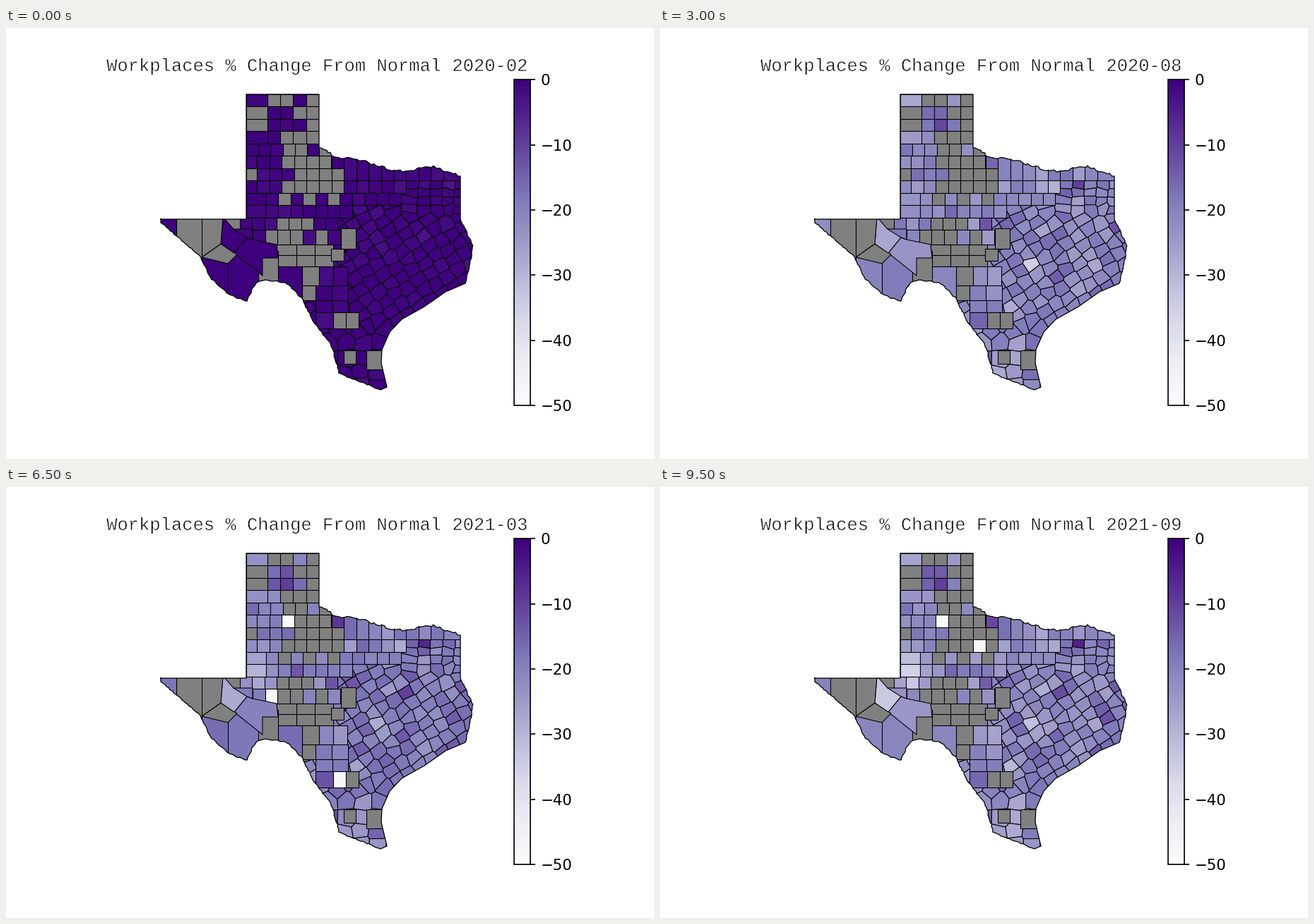
Write a matplotlib script that moves like this. It is 917 px wide and 611 px high and loops after 10000 ms.

```python
import numpy as np
import matplotlib.pyplot as plt
from matplotlib import patheffects
from matplotlib.animation import FuncAnimation
from matplotlib.collections import PolyCollection
from matplotlib.path import Path

W, H = 917, 611
DPI = W / 6
MONTHS = 20
rng = np.random.default_rng(12)

# State border, clockwise: a few turning points, roughened along the rivers
PANHANDLE = [(219, 271), (340, 271), (340, 94), (443, 94)]
RED_RIVER = [(443, 170), (466, 182), (503, 188), (540, 200), (565, 203), (604, 196), (643, 210)]
SABINE = [(643, 271), (661, 309), (654, 346), (650, 362)]
COAST = [(622, 374), (592, 395), (560, 413), (543, 431), (532, 456), (531, 475), (539, 509)]
RIO_GRANDE = [(530, 513), (472, 490), (460, 449), (436, 418), (419, 384), (396, 361),
              (366, 357), (353, 362), (340, 388), (314, 377), (290, 355), (276, 325),
              (236, 290), (219, 276)]

# Grid rows from the north: left edge, first width, pitch, count, columns without data
ROW_EDGES = [*(94 + 17.45 * np.arange(12)), 307, 322, 338, 365, 386, 403, 426]
ROWS = [(340, 30, 18.2, 5, {1, 2, 4}), (340, 30, 18.2, 5, {0, 3, 4}),
        (340, 30, 18.2, 5, {0, 4}), (340, 30, 18.2, 5, {2, 3, 4}),
        (340, 17.2, 17.2, 6, {3, 4}), (340, 15, 17.5, 7, {3, 4, 5, 6}),
        (340, 15, 17.6, 8, {0, 4, 5, 6, 7}), (340, 15, 17.6, 13, {3, 4, 5, 6, 7}),
        (340, 28, 17.4, 12, {2, 4, 6}), (340, 28, 17.4, 8, {}),
        (331, 17.3, 17.3, 8, {3, 4, 5}), (349, 17.7, 17.7, 7, {1, 2, 3, 5}),
        (383, 28, 26, 3, {0, 1, 2}), (383, 28, 26, 3, {0, 1, 2}),
        (419, 24, 20, 3, {0}), (419, 19, 23, 3, {0}),
        (438, 24, 22, 2, {}), (438, 25, 18, 3, {1, 2})]

# Local departures: x, y, radius, shift in the first and in the second summer
SPOTS = [(548, 232, 17, -12, -7), (518, 334, 12, -14, -9), (598, 355, 16, -9, -5),
         (592, 226, 8, 9, 13), (574, 283, 8, 3, 14), (532, 386, 8, 0, 18),
         (630, 320, 16, 2, 7), (472, 188, 25, 3, 8), (388, 130, 24, 3, 6),
         (350, 262, 26, -2, -17), (315, 298, 20, -6, -12), (500, 487, 35, -5, -5)]
# Counties with enough reports only in some months, all with deep drops
SPARSE = {(399, 190): (8, 13, 19), (452, 225): (8, 19), (376, 296): (8, 13, 17), (472, 414): (11, 13)}


def roughen(points, amount):
    """Resample a line every few pixels and jitter the new points."""
    pts = np.array(points, float)
    along = np.r_[0, np.hypot(*np.diff(pts, axis=0).T).cumsum()]
    t = np.linspace(0, along[-1], int(along[-1] / 3.5))
    line = np.column_stack([np.interp(t, along, axis) for axis in pts.T])
    line[1:-1] += rng.uniform(-amount, amount, (len(t) - 2, 2))
    return line


def box(x0, y0, x1, y1):
    return [(x0, y0), (x1, y0), (x1, y1), (x0, y1)]


def lattice(xs, ys, angle, jitter):
    """Seeded scatter around a grid turned about the middle of the eastern half."""
    grid = np.array([(x, y) for x in xs for y in ys], float)
    c, s = np.cos(angle), np.sin(angle)
    return grid @ [[c, s], [-s, c]] + (545, 330) + rng.uniform(-jitter, jitter, grid.shape)


def clip_half_plane(poly, normal, limit):
    out = []
    for p, q in zip(poly, poly[1:] + poly[:1]):
        dp, dq = normal @ p - limit, normal @ q - limit
        if dp <= 0:
            out.append(p)
        if dp * dq < 0:
            out.append(p + (q - p) * dp / (dp - dq))
    return out


def nearest_cell(site, sites):
    """The area closer to this site than to any other."""
    poly = [np.array(p, float) for p in box(400, 170, 680, 530)]
    order = np.argsort(((sites - site) ** 2).sum(1))
    for other in sites[order[1:28]]:
        normal = other - site
        poly = clip_half_plane(poly, normal, normal @ (site + other) / 2)
    return poly


cells, centres, usual = [], [], []


def add_cell(poly, has_data=True, centre=None):
    cells.append(np.array(poly, float))
    centres.append(np.mean(poly, axis=0) if centre is None else centre)
    usual.append(rng.normal(-19.5, 2.6) if has_data else np.nan)


# Irregular counties: tilted in the centre, flat rows in the north-east, larger in the south
tilted = lattice(np.arange(-190, 190, 19), np.arange(-170, 180, 16.5), -0.55, 3.2)
x, y = tilted.T
tilted = tilted[(x > 410) & (x < 670) & (y < 435) & ((y > 262) | (x < 560) & (y > 240))]
flat = lattice(np.arange(30, 120, 17), np.arange(-108, -70, 11.5), 0, 2.5)
south = lattice(np.arange(-110, 10, 23), np.arange(116, 185, 21), 0, 3)
sites = np.vstack([tilted, flat, south])
for site in sites:
    add_cell(nearest_cell(site, sites), centre=site)

# Counties along the Red River, then the grid over them
for k in range(11):
    left = 443 + 17.6 * k
    add_cell(box(left, 160, left + (24 if k == 10 else 17.6), 216), k > 0)
for top, bottom, (left, first, pitch, count, missing) in zip(ROW_EDGES, ROW_EDGES[1:], ROWS):
    edges = [left, *(left + first + pitch * np.arange(count))]
    for col in range(count):
        add_cell(box(edges[col], top, edges[col + 1], bottom), col not in missing)
for corners in [(460, 313, 478, 330), (474, 284, 495, 313), (478, 457, 495, 476), (510, 457, 533, 484)]:
    add_cell(box(*corners), False)

# Far west, painted back to front
add_cell(box(384, 338, 419, 390))
add_cell(box(314, 321, 384, 395))
add_cell(box(270, 325, 314, 395))
add_cell(box(357, 316, 385, 372), False)
add_cell([(341, 297), (349, 300), (383, 307), (385, 326), (363, 326), (363, 351), (323, 319)])
add_cell([(277, 325), (304, 306), (327, 321), (314, 334)], False)
add_cell([(307, 268), (341, 297), (323, 319), (304, 306)])
add_cell([(277, 268), (307, 268), (304, 306), (277, 325)], False)
add_cell(box(241, 268, 277, 330), False)
add_cell(box(215, 268, 241, 300))
add_cell([(307, 268), (331, 268), (331, 285), (322, 285)], False)
add_cell([(322, 285), (349, 285), (349, 300), (341, 297)])

# Change over time: a common level, local trends and monthly noise
centres, usual = np.array(centres), np.array(usual)
months = np.arange(MONTHS)
level = np.interp(months, [0, 2, 4, 8, 11, 12, 13, 14, 17, 18, 19],
                  [0.02, 1.8, 1.15, 0.95, 1.08, 1.3, 0.97, 0.93, 1.3, 1.1, 1.08])
values = level[:, None] * usual + rng.normal(0, 1, (MONTHS, len(usual)))
for x, y, radius, early, late in SPOTS:
    reach = np.exp(-((centres - (x, y)) ** 2).sum(1) / radius ** 2)
    trend = np.interp(months, [5, 17], [early, late]) * np.minimum(level, 1)
    values += trend[:, None] * reach
for place, reported in SPARSE.items():
    county = ((centres - place) ** 2).sum(1).argmin()
    values[list(reported), county] = -48
values = np.ma.masked_invalid(values)

fig = plt.figure(figsize=(W / DPI, H / DPI), dpi=DPI, facecolor="white")
ax = fig.add_axes([0, 0, 1, 1])
ax.set(xlim=(0, W), ylim=(H, 0))
ax.axis("off")

border = np.vstack([PANHANDLE, roughen(RED_RIVER, 1.8), roughen(SABINE, 0.9), COAST,
                    roughen(RIO_GRANDE, 0.9), PANHANDLE[:1]])
cmap = plt.get_cmap("Purples").with_extremes(bad="gray")
counties = PolyCollection(cells, cmap=cmap, edgecolors="black", linewidths=0.5)
counties.set_clim(-50, 0)
counties.set_array(values[0])
ax.add_collection(counties, autolim=False)
counties.set_clip_path(Path(border), ax.transData)
ax.plot(*border.T, color="black", lw=0.6)

cax = fig.add_axes([719 / W, 1 - 535 / H, 23 / W, 461.7 / H])
fig.colorbar(counties, cax=cax, ticks=range(-50, 1, 10))
cax.tick_params(labelsize=10)

# A white rim thins the strokes of the title
thin = [patheffects.Stroke(linewidth=0.3, foreground="white")]
title = ax.text(439.6, 61, "", family="Liberation Mono", size=12, ha="center", va="baseline",
                path_effects=thin)


def update(i):
    year, month = divmod(i + 1, 12)
    title.set_text(f"Workplaces % Change From Normal {2020 + year}-{month + 1:02d}")
    counties.set_array(values[i])
    return counties, title


anim = FuncAnimation(fig, update, frames=MONTHS, interval=500, repeat=True, repeat_delay=0)
plt.show()
```
